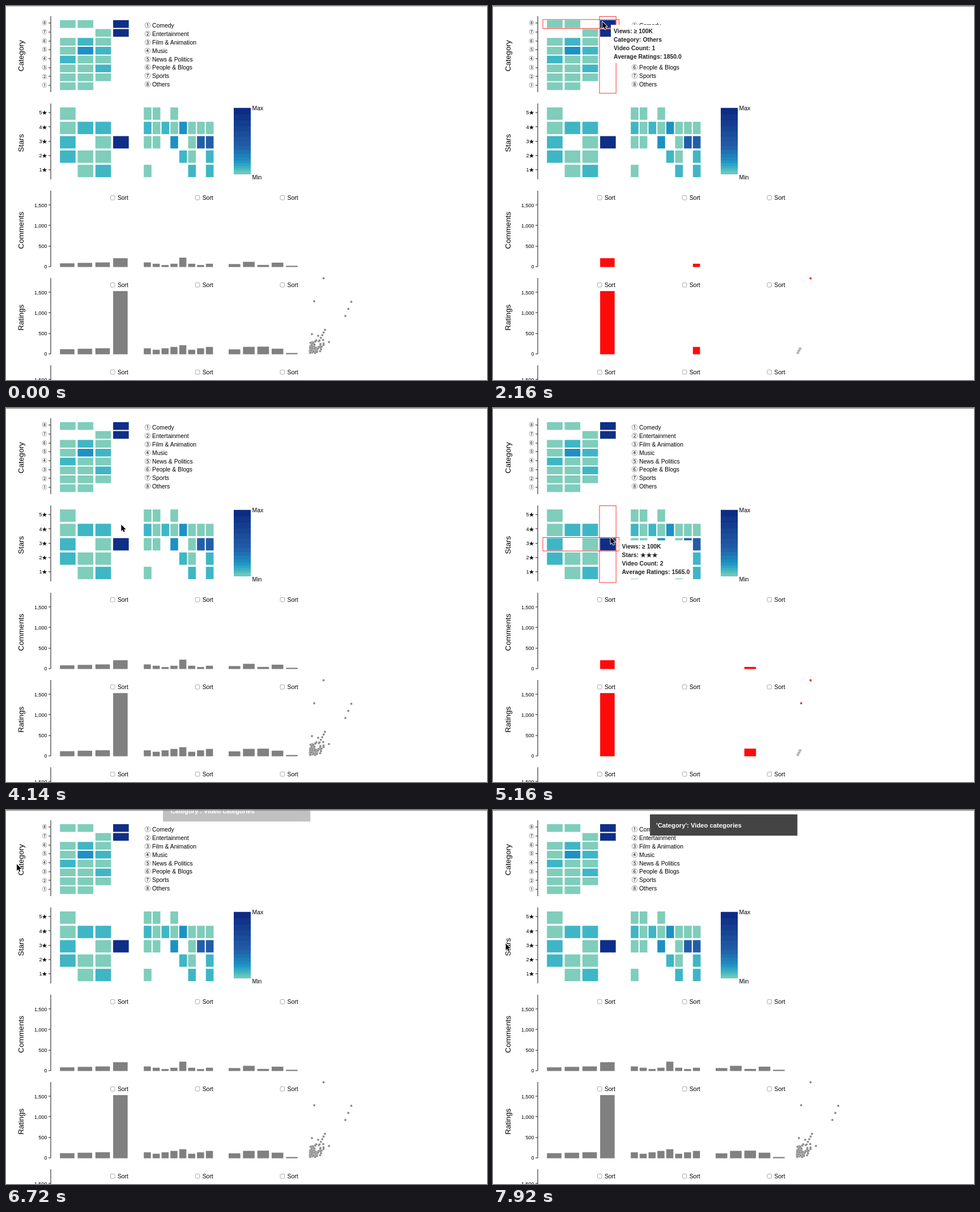
Animation of 849 by 660 pixels, one loop 8 s. Source, as an HTML page:

```html
<!DOCTYPE html>
<html lang="en">
<head>
<meta charset="utf-8">
<title>Video statistics</title>
<style>
  html, body { margin: 0; width: 100%; height: 100%; overflow: hidden; background: #fff; }
  svg { display: block; width: 849px; height: 660px; }
  text { font: 10.4px "Liberation Sans", "Noto Sans CJK JP", "Noto Sans CJK SC", "DejaVu Sans", sans-serif; white-space: pre; }
  .title { font-size: 13.6px; text-anchor: middle; }
  .tick { font-size: 9px; text-anchor: end; }
  .tip { font-weight: bold; fill: #222; }
  .toast { font-size: 11.25px; font-weight: bold; fill: #fff; }
  .digit { font-family: "Noto Sans CJK JP", "Noto Sans CJK SC", "DejaVu Sans", sans-serif; }
</style>
</head>
<body>
<svg id="stage" viewBox="0 0 849 660"></svg>
<script>
const LOOP = 8000, STEP = 60;
const stage = document.getElementById('stage');
const COLORS = { L: '#7fcdbb', M: '#3fb6c5', B: '#1d91c3', D: '#225ea8', N: '#0f2e87' };
const GREY = '#808080', RED = '#ff0a0a';
const DIGITS = '①②③④⑤⑥⑦⑧';
const NAMES = ['Comedy', 'Entertainment', 'Film & Animation', 'Music',
  'News & Politics', 'People & Blogs', 'Sports', 'Others'];

// Spacing shared by heat maps, bars and hover outlines
const VIEWS = { x: 95.2, dx: 31.3, w: 27.6 };
const KINDS = { x: 243.2, dx: 15.66, w: 13.6 };
const RANKS = { x: 393, dx: 25.3, w: 22.4 };
const CATEGORY = { top: 18, y: 25, dy: 15.67, h: 13.6, rows: 8 };
const STARS = { top: 172, y: 179, dy: 25.3, h: 21.8, rows: 5 };

function add(parent, tag, attrs, content) {
  const el = document.createElementNS('http://www.w3.org/2000/svg', tag);
  set(el, attrs);
  if (content !== undefined) el.textContent = content;
  return parent.appendChild(el);
}
function set(el, attrs) {
  for (const key in attrs) el.setAttribute(key, attrs[key]);
}
const rect = (parent, x, y, width, height, fill, extra) =>
  add(parent, 'rect', { x, y, width, height, fill, ...extra });
const label = (parent, x, y, content, cls = '') =>
  add(parent, 'text', { x, y, class: cls }, content);
const show = (el, on) => set(el, { visibility: on ? 'visible' : 'hidden' });
const range = n => [...Array(n).keys()];

// Axes and row titles
function axis(top, title, names, first, step, cls = '') {
  rect(stage, 78.5, top, 1, 134, '#111');
  names.forEach((name, i) => {
    const y = top + first + step * i;
    rect(stage, 75, Math.round(y) - 0.5, 4, 1, '#222');
    label(stage, 72.5, y + 3.2, name, 'tick ' + cls);
  });
  const y = top + 69.8;
  add(stage, 'text', { class: 'title', x: 31, y, transform: `rotate(-90 31 ${y})` }, title);
}
const COUNTS = ['1,500', '1,000', '500', '0'];
axis(18, 'Category', [...DIGITS].reverse(), 12.1, 15.7, 'digit');
axis(172, 'Stars', range(5).map(i => 5 - i + '★'), 16, 25.3);
['Comments', 'Ratings', ''].forEach((title, i) => axis(326 + 154 * i, title, COUNTS, 25.3, 36.1));

// Heat maps, one word per row
function heat(words, col, row) {
  words.split(' ').forEach((word, r) => [...word].forEach((key, c) => {
    if (COLORS[key]) rect(stage, col.x + col.dx * c, row.y + row.dy * r, col.w, row.h, COLORS[key]);
  }));
}
heat('LL-N --LN LML LBM MLL LLM LLL LL', VIEWS, CATEGORY);
heat('L LMM M-LN MLL -LM', VIEWS, STARS);
heat('LL-L MLMLBLLL LL-B-LDD ----ML-M L----M-M', KINDS, STARS);

NAMES.forEach((name, i) => {
  const y = 38 + 14.88 * i;
  label(stage, 244.8, y, DIGITS[i], 'digit');
  label(stage, 258, y, name);
});

// Colour key: band edges grow with the square of their index
const STOPS = [[0, 0x7fcdbb], [0.1, 0x41b6c4], [0.22, 0x1d91c3], [0.45, 0x225ea8], [1, 0x0c2c84]];
function shade(p) {
  const i = Math.max(1, STOPS.findIndex(s => s[0] >= p));
  const [p0, a] = STOPS[i - 1], [p1, b] = STOPS[i];
  const k = (p - p0) / (p1 - p0);
  const mix = s => Math.round((a >> s & 255) * (1 - k) + (b >> s & 255) * k);
  return `rgb(${mix(16)},${mix(8)},${mix(0)})`;
}
const BANDS = 20;
for (let i = BANDS; i > 0; i--) {
  const h = 116.4 * (i / BANDS) ** 2;
  rect(stage, 402, 296.2 - h, 30, h, shade((i / BANDS) ** 2));
}
label(stage, 434.6, 184, 'Max');
label(stage, 434.6, 306, 'Min');

// Bar charts: a comments rule and a ratings rule per group
const wave = i => Math.PI / 2 * i;
const GROUPS = [
  { col: VIEWS, n: 4, rules: [i => i === 3 ? 15.5 : 6.5 + 0.8 * i, i => i === 3 ? 111.5 : 9 + 0.8 * i] },
  { col: KINDS, n: 8, rules: [i => i === 4 ? 16.5 : 5.8 + 2.3 * Math.cos(wave(i)),
    i => i === 4 ? 16 : 10.5 - 2.5 * Math.sin(wave(i))] },
  { col: RANKS, n: 5, rules: [i => 5.2 - 0.75 * i + 4.7 * (i % 2), i => 13.8 - 2 * (i - 1.6) ** 2] }
];
const bars = [];
GROUPS.forEach(({ col, n, rules }, group) => {
  const w = col.w - Math.min(2, col.w * 0.08);
  rules.forEach((rule, panel) => range(n).forEach(index => {
    const h = rule(index);
    const el = rect(stage, col.x + col.dx * index, 460.6 + 154 * panel - h, w, h, GREY);
    bars.push({ el, group, index });
  }));
  range(3).forEach(panel => {
    const x = 184.5 + 149.8 * group, y = 334.5 + 153.9 * panel;
    rect(stage, x, y, 7.6, 7.6, '#fff', { rx: 1.6, stroke: '#a8a8a8' });
    label(stage, x + 12.4, y + 7.7, 'Sort');
  });
});

// Scatter plot: a dense seeded cluster, two trails and the two top videos
let seed = 11;
const rnd = () => (seed = seed * 16807 % 2147483647) / 2147483647;
const spread = (mean, max) => Math.min(max, -mean * Math.log(1 - rnd()));
const dots = add(stage, 'g', {});
const dot = (parent, cx, cy, fill = GREY, stroke = '#ddd') =>
  add(parent, 'circle', { cx, cy, r: 1.95, fill, stroke, 'stroke-width': 0.5 });
for (let i = 0; i < 110; i++) {
  const dx = spread(6, 24);
  dot(dots, 536.5 + dx, 612.5 - Math.min(23, spread(6, 18) + dx * 0.45 * rnd()));
}
range(3).forEach(i => dot(dots, 599 + 5.2 * i, 547 - 12.5 * i));
range(5).forEach(i => dot(dots, 563 - 2.4 * i, 571.5 + 4.7 * i));
dot(dots, 540, 579);
dot(dots, 551, 582);
dot(dots, 570, 593);
const peaks = [dot(stage, 560.5, 480.5), dot(stage, 544, 521)];
const faded = add(stage, 'g', {});
range(6).forEach(i => dot(faded, 537.5 + i, 612 - 1.9 * i + 2 * (i % 2), '#b0b0b0', '#c4c4c4'));

// Hover outlines and tooltip
const outline = { stroke: '#f33', 'stroke-width': 1 };
const marks = add(stage, 'g', {});
const colMark = rect(marks, 188, 18, 29.2, 135.5, 'none', outline);
const rowMark = rect(marks, 88, 24, 134.5, 16, 'none', outline);
const tip = add(stage, 'g', {});
rect(tip, 0, 0, 130.4, 67.6, '#fff');
const lines = range(4).map(i => label(tip, 5, 14.7 + 14.95 * i, '', 'tip'));

const VIDEO_RATINGS = [1850, 1280];
const HOVERS = [
  { from: 2160, to: 3000, group: 1, index: 7, videos: [0] },
  { from: 3120, to: 3600, group: 1, index: 6, videos: [1] },
  { from: 4680, to: 5280, group: 2, index: 2, videos: [0, 1] }
];

function setHover(hover, x, y) {
  for (const el of [marks, tip, faded]) show(el, hover);
  show(dots, !hover);
  for (const { el, group, index } of bars) {
    const hit = hover && index === (group === 0 ? 3 : group === hover.group ? hover.index : -1);
    show(el, !hover || hit);
    set(el, { fill: hit ? RED : GREY });
  }
  peaks.forEach((el, i) => {
    show(el, !hover || hover.videos.includes(i));
    set(el, { fill: hover ? RED : GREY });
  });
  if (hover) placeTip(hover, x, y);
}

function placeTip({ group, index, videos }, x, y) {
  const row = group === 1 ? CATEGORY : STARS;
  set(colMark, { y: row.top + 0.5 });
  set(rowMark, { y: row.y + row.dy * (row.rows - 1 - index) - 1.1, height: row.h + 2 });
  set(tip, { transform: `translate(${x + 15} ${y + 5.5})` });
  const mean = videos.reduce((sum, v) => sum + VIDEO_RATINGS[v], 0) / videos.length;
  const text = [
    'Views: ≥ 100K',
    group === 1 ? 'Category: ' + NAMES[index] : 'Stars: ' + '★'.repeat(index + 1),
    'Video Count: ' + videos.length,
    'Average Ratings: ' + mean.toFixed(1)
  ];
  lines.forEach((el, i) => { el.textContent = text[i]; });
}

// Notification, window edge and pointer
const toast = add(stage, 'g', {});
rect(toast, 277, 7.7, 260.3, 37.6, '#444');
label(toast, 288, 31, "'Category': Video categories", 'toast');
const edge = rect(stage, 0, 0, 849, 1, '#bbb');
const pointer = add(stage, 'path', {
  d: 'M0 0V11.8L2.7 9.3 4.4 13.4 6.4 12.6 4.7 8.6H8.4Z',
  stroke: '#fff', 'stroke-width': 1.8, 'stroke-linejoin': 'round', 'paint-order': 'stroke'
});

// Pointer moves: begin, end, x, y; it rests in between
const MOVES = [
  [60, 840, 370, 27], [840, 1260, 220, 13], [1260, 1800, 192.5, 27.5], [2100, 2340, 196, 29],
  [2700, 3060, 202, 40], [3480, 4300, 203.5, 224], [4620, 4740, 207.5, 228],
  [5160, 5940, 27, 123], [5940, 6120, 19, 95.5], [7320, 7620, 48.5, 150], [7620, 7920, 22.5, 235.5]
];
const clamp = p => Math.max(0, Math.min(1, p));
const ease = p => p * p * (3 - 2 * p);
function pointAt(t) {
  let x = 450, y = 0;
  for (const [begin, end, toX, toY] of MOVES) {
    const k = ease(clamp((t - begin) / (end - begin)));
    x += (toX - x) * k;
    y += (toY - y) * k;
  }
  return [x, y];
}

function draw(now) {
  const t = Math.min(Math.floor(now % LOOP / STEP) * STEP, 7920);
  const [x, y] = pointAt(t);
  show(pointer, t >= 60);
  set(pointer, { transform: `translate(${x} ${y})` });
  setHover(HOVERS.find(h => t >= h.from && t < h.to), x, y);
  set(edge, { fill: t < 1980 ? '#bbb' : '#777' });

  const p = clamp(0.33 + 0.67 * (t - 6720) / 240);
  show(toast, t >= 6720);
  set(toast, { opacity: p, transform: `translate(0 ${-37.3 * (1 - p)})` });
}

const start = performance.now();
function loop() {
  draw(performance.now() - start);
  requestAnimationFrame(loop);
}
loop();
</script>
</body>
</html>
```
